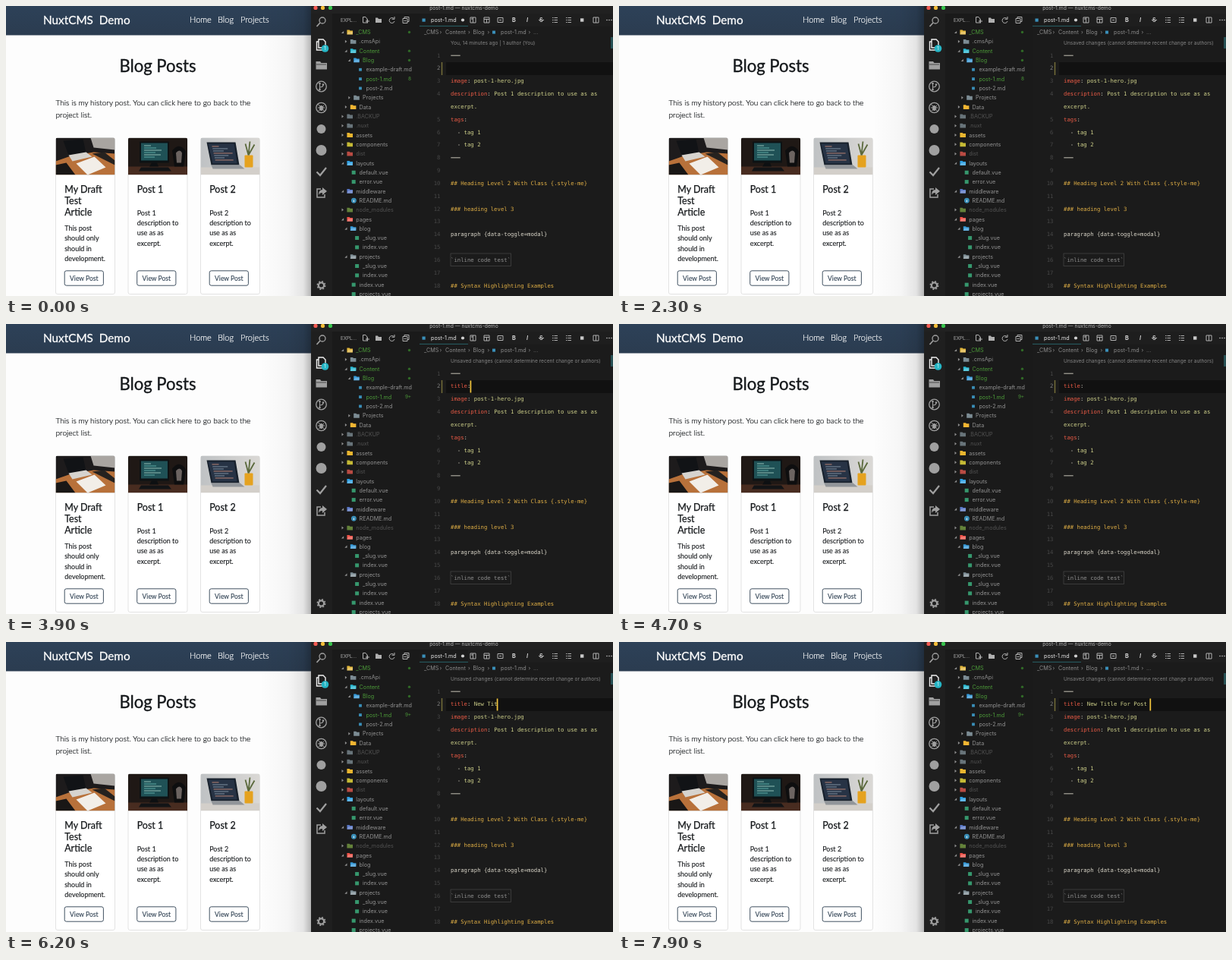
An HTML page for the animation above (8000 ms loop, 800 px wide and 382 px high).

```html
<!DOCTYPE html>
<html>
<head>
<meta charset="utf-8">
<style>
html, body { margin: 0; width: 100%; height: 100%; overflow: hidden; background: #fff; }
svg { display: block; width: 800px; height: 382px; }
text { white-space: pre; }
.lato { font-family: Lato, sans-serif; }
.ui { font-family: Inter, sans-serif; }
.code { font-family: "DejaVu Sans Mono", monospace; font-size: 7.3px; }
</style>
</head>
<body>
<svg id="stage" viewBox="0 0 800 382">
  <defs>
    <linearGradient id="bar" x2="0" y2="1">
      <stop stop-color="#2d4158"/><stop offset="1" stop-color="#2b3c50"/>
    </linearGradient>
    <linearGradient id="shade">
      <stop stop-opacity="0"/><stop offset=".55" stop-opacity=".03"/>
      <stop offset=".85" stop-opacity=".1"/><stop offset="1" stop-opacity=".28"/>
    </linearGradient>
    <linearGradient id="wall"><stop stop-color="#bfc2c4"/><stop offset="1" stop-color="#dad8d5"/></linearGradient>
    <clipPath id="photo"><path d="M0 49V2Q0 0 2 0H76Q78 0 78 2V49Z"/></clipPath>
  </defs>
</svg>
<script>
const stage = document.getElementById('stage');
const out = [];
const add = s => out.push(s);
const rect = (x, y, w, h, fill, extra = '') =>
  add(`<rect x="${x}" y="${y}" width="${w}" height="${h}" fill="${fill}" ${extra}/>`);
const circle = (x, y, r, fill, extra = '') =>
  add(`<circle cx="${x}" cy="${y}" r="${r}" fill="${fill}" ${extra}/>`);
const path = (d, fill, extra = '') => add(`<path d="${d}" fill="${fill}" ${extra}/>`);
const line = (d, color = '#b0b0b0', w = 1) => path(d, 'none', `stroke="${color}" stroke-width="${w}"`);
const text = (cls, x, y, size, fill, s, extra = '') =>
  add(`<text class="${cls}" x="${x}" y="${y}" font-size="${size}" fill="${fill}" ${extra}>${s}</text>`);
const lato = (...a) => text('lato', ...a);
const ui = (...a) => text('ui', ...a);
const bolder = (color, w) => `stroke="${color}" stroke-width="${w}"`;

const INK = '#15181b';

function drawPage() {
  const light = 'font-weight="300" ';
  rect(0, 0, 402, 382, '#fdfdfd');
  rect(0, 0, 402, 38.5, 'url(#bar)');
  lato(49, 23.5, 15.3, '#fff', 'NuxtCMS\u00a0\u00a0Demo', bolder('#fff', .3));
  [[242, 'Home'], [279, 'Blog'], [309, 'Projects']].forEach(([x, s]) =>
    lato(x, 21.5, 11, '#fff', s, light + bolder('#fff', .2)));
  lato(200, 87, 22.1, INK, 'Blog Posts', 'text-anchor="middle" ' + bolder(INK, .35));
  ['This is my history post. You can click here to go back to the', 'project list.'].forEach((s, i) =>
    lato(65.5, 131 + i * 16, 10.14, INK, s, light + bolder(INK, .18)));
  const cards = [
    [65.5, ['My Draft', 'Test', 'Article'], ['This post', 'should only', 'should in', 'development.'], 293, deskPhoto],
    [161, ['Post 1'], ['Post 1', 'description to', 'use as as', 'excerpt.'], 272.5, monitorPhoto],
    [256.5, ['Post 2'], ['Post 2', 'description to', 'use as as', 'excerpt.'], 272.5, laptopPhoto]
  ];
  for (const [x, title, body, y, photo] of cards) {
    rect(x, 174, 78, 205.5, '#fff', 'rx="2.5" stroke="#dcdcdc" stroke-width=".8"');
    add(`<g transform="translate(${x} 173.5)" clip-path="url(#photo)">`);
    photo();
    add('</g>');
    title.forEach((s, i) => lato(x + 11.7, 245.5 + i * 15.2, 12.5, INK, s, bolder(INK, .25)));
    body.forEach((s, i) => lato(x + 11.7, y + 3 + i * 13.4, 9, INK, s, bolder(INK, .1)));
    rect(x + 11.7, 348.8, 51.2, 19.4, '#fff', 'rx="2.4" stroke="#2c3e50" stroke-width=".9"');
    lato(x + 37.3, 361.8, 8.5, '#2c3e50', 'View Post', 'text-anchor="middle" ' + bolder('#2c3e50', .1));
  }
  rect(335, 0, 67, 382, 'url(#shade)');
}

function deskPhoto() {
  rect(0, 0, 78, 49, '#1d1b1c');
  path('M46 0H78V16L50 13Z', '#a9a5a1');
  path('M0 31L20 24 50 19 78 21V49H0Z', '#b8713a');
  path('M10 4L36 2 40 20 17 23Z', '#111316');
  path('M17 23L40 19 48 25 22 31Z', '#d6d3ce');
  path('M27 34L51 25 66 39 42 49Z', '#f2eee8');
  path('M48 21L64 19 78 30V36Z', '#26221f');
  path('M0 36L14 33 26 49H0Z', '#191716');
}

function monitorPhoto() {
  rect(0, 0, 78, 49, '#1f1815');
  rect(0, 38, 78, 11, '#482c20');
  rect(15, 5, 39, 28, '#0d1214', 'rx="1"');
  rect(17, 7, 35, 23, '#1f5156');
  for (let i = 0; i < 6; i++) rect(21, 10 + i * 3, 9 + i * 7 % 15, 1, i % 2 ? '#5fa9a4' : '#92bdb3');
  path('M31 33H38L40 38H28Z', '#0d1012');
  path('M17 39H53L57 44H14Z', '#121416');
  path('M58 17Q68 5 76 18L73 38H61Z', '#0e0e0f');
  path('M63 20Q68 14 71 20L70 33H64Z', '#6c6461');
}

function laptopPhoto() {
  rect(0, 0, 78, 49, 'url(#wall)');
  rect(0, 39, 78, 10, '#d3cfca');
  path('M8 6H46L51 36H14Z', '#18212c');
  path('M10 8H44L48 34H16Z', '#273345');
  for (let i = 0; i < 7; i++) rect(15 + i * .7, 11 + i * 3, 9 + i * 11 % 17, .9, i % 3 ? '#8798a8' : '#c88b79');
  path('M14 36H52L58 41H16Z', '#92969a');
  rect(58, 23, 11, 16, '#e5a21f', 'rx="1"');
  line('M63 23L59 8M63 23L65 5M63 23L71 9', '#5b693c', 1.8);
}

function drawActivityBar() {
  const c = '#a0a0a0';
  circle(417, 19, 4, 'none', `stroke="${c}" stroke-width="1.3"`);
  line('M414 22L409.5 27', c, 1.7);
  line('M412 44H418L421 47V55H412ZM412 47H409.5V58H417', '#f0f0f0', 1.4);
  circle(420.5, 56, 4.8, '#25b5c5');
  ui(420.5, 58.3, 6, '#fff', '1', 'text-anchor="middle"');
  path('M408.5 73H414L415.5 75H423V83.5H408.5Z', c);
  line('M409 77H422', '#333', .8);
  circle(415.5, 106, 6.8, 'none', `stroke="${c}" stroke-width="1.3"`);
  line('M413.5 102V110M413.5 107Q418 107 418 104', c, 1.1);
  [[413.5, 102], [418, 103.5], [413.5, 110]].forEach(([x, y]) => circle(x, y, 1.3, c));
  circle(415.5, 134, 6.7, 'none', `stroke="${c}" stroke-width="1.3"`);
  add(`<ellipse cx="415.5" cy="134.5" rx="2.4" ry="3.6" fill="${c}"/>`);
  line('M411 129L420 139M411 134H420M412 138L419 131', c);
  circle(415.5, 162, 6, c);
  circle(415.5, 190, 7, c);
  line('M409.5 218.5L414 223 422 213', c, 2.2);
  line('M415 241H410V252H420V248', c, 1.5);
  path('M417 239L423 244 417 249V246Q413 246 412 249 412 242 417 242Z', c);
  circle(415.5, 368, 3.6, 'none', `stroke="${c}" stroke-width="2.2"`);
  circle(415.5, 368, 5.2, 'none', `stroke="${c}" stroke-width="1.5" stroke-dasharray="2.04"`);
}

// depth, kind (open, closed, leaf kinds), name, icon colour, text colour
const GREEN = '#4c9a39', DIM = '#525252', PLAIN = '#929292', BLUE = '#3a8fb9', VUE = '#36976d';
const tree = [
  [0, 'open', '_CMS', '#e0b53b', GREEN], [1, 'closed', '.cmsApi', '#7c8c94'],
  [1, 'open', 'Content', '#27b7d0', GREEN], [2, 'open', 'Blog', '#3599d8', GREEN],
  [3, 'md', 'example-draft.md', BLUE], [3, 'md', 'post-1.md', BLUE, GREEN], [3, 'md', 'post-2.md', BLUE],
  [2, 'closed', 'Projects', '#7c8c94'], [1, 'closed', 'Data', '#f2b632'],
  [0, 'closed', '.BACKUP', '#68747a', DIM], [0, 'closed', '.nuxt', '#68747a', DIM],
  [0, 'closed', 'assets', '#e9b52f'], [0, 'closed', 'components', '#c5ba35'],
  [0, 'closed', 'dist', '#b94b43', DIM], [0, 'open', 'layouts', '#2d9fe3'],
  [1, 'vue', 'default.vue', VUE], [1, 'vue', 'error.vue', VUE],
  [0, 'open', 'middleware', '#5876c5'], [1, 'info', 'README.md', BLUE],
  [0, 'closed', 'node_modules', '#64823a', DIM], [0, 'open', 'pages', '#ee5147'],
  [1, 'open', 'blog', '#3599d8'], [2, 'vue', '_slug.vue', VUE], [2, 'vue', 'index.vue', VUE],
  [1, 'open', 'projects', '#7c8c94'], [2, 'vue', '_slug.vue', VUE], [2, 'vue', 'index.vue', VUE],
  [1, 'vue', 'index.vue', VUE], [1, 'vue', 'projects.vue', VUE]
];

function drawTree() {
  tree.forEach(([depth, kind, name, icon, color = PLAIN], i) => {
    const y = 34.5 + i * 12.32, dx = depth * 4.4, x = 453 + dx;
    if (kind === 'open' || kind === 'closed') {
      const ax = 443.5 + dx;
      path(kind === 'open' ? `M${ax + 1.6} ${y - 1.6}V${y + 1.6}H${ax - 1.6}Z`
        : `M${ax - 1} ${y - 2}L${ax + 1.5} ${y} ${ax - 1} ${y + 2}Z`, '#909090');
      path(`M${x - 3.6} ${y - 2.9}H${x - .4}L${x + .6} ${y - 1.9}H${x + 4}V${y + 2.9}H${x - 3.6}Z`, icon);
      if (kind === 'open') path(`M${x - 2} ${y - .6}H${x + 4.4}L${x + 3.4} ${y + 2.9}H${x - 3.6}Z`, '#fff', 'opacity=".25"');
    } else if (kind === 'info') {
      circle(x + 1, y, 3.4, icon);
      rect(x + .5, y - .6, 1, 2.4, '#fff');
    } else {
      const s = kind === 'md' ? 3.8 : 5;
      rect(x + .8 - s / 2, y - s / 2, s, s, icon);
    }
    ui(461.2 + dx, y + 2.6, 7.2, color, name);
  });
  [0, 2, 3].forEach(i => circle(531.5, 34.5 + i * 12.32, 1.7, '#316b27'));
  ui(532, 98.4, 6.4, GREEN, '8', 'id="badge" text-anchor="middle"');
}

function drawToolbar() {
  [['#f35b52', 408], ['#f4bd39', 417.5], ['#38c44d', 427.5]].forEach(([c, x]) => circle(x, 2.4, 2.6, c));
  ui(603.5, 5, 6.75, '#b5b5b5', 'post-1.md — nuxtcms-demo', 'text-anchor="middle"');
  ui(441, 20.8, 6.3, '#b0b0b0', 'EXPL...');
  line('M470.5 14.5H474L476 17V22H470.5ZM474 20H479M476.5 17.5V22.5');
  path('M487 15.5H490L491 17H495V22H487Z', '#b0b0b0');
  line('M511.5 17A3.5 3.5 0 1 0 512 20M512 14V17.3H508.5');
  line('M523 16.5H529V22.5H523ZM525 16V14.5H531V20.5H529M524.5 19.5H527.5');
  rect(548.5, 16.5, 4.2, 4.2, BLUE);
  ui(560, 21, 7.2, '#e8e8e8', 'post-1.md');
  circle(602, 18.5, 2.1, '#d0d0d0');
  line('M545 26.4H609', '#2b6870', .9);
  line('M612 15H619V22H612ZM615.5 15V22M613 17H615');
  line('M630 15H637V22H630ZM630 17.5H637M633.5 17.5V22');
  line('M648 15.5H655V21.5H648ZM650 18.5H653');
  ui(667, 21, 7.3, '#ddd', 'B', 'font-weight="700"');
  ui(686, 21, 7.3, '#ddd', 'I', 'font-weight="600" font-style="italic"');
  ui(703, 21, 7.3, '#ddd', 'S', 'font-weight="600"');
  line('M702 18.5H709');
  [720, 738].forEach(x => line([15.5, 18.5, 21.5].map(y => `M${x} ${y}h1.5m1 0h4.5`).join('')));
  rect(757, 16.3, 4.4, 4.4, '#c8c8c8');
  line('M774 15H781V22H774ZM777.5 15V22');
  [792, 795, 798].forEach(x => circle(x, 18.5, .8, '#c8c8c8'));
  [[551, '_CMS'], [571.5, '›'], [579, 'Content'], [609, '›'], [615.5, 'Blog'], [634.5, '›'],
   [652, 'post-1.md'], [688.5, '›'], [695, '...']].forEach(([x, s]) => ui(x, 37, 7.2, '#8c8c8c', s));
  rect(641, 32.6, 4, 4, BLUE);
}

const KEY = '#e85a45', VALUE = '#ced08a', HEAD = '#dfae45', WHITE = '#d9d5c8';
const span = (color, s) => `<tspan fill="${color}">${s}</tspan>`;
const pair = (key, value) => span(KEY, key) + span(WHITE, ':') + span(VALUE, value);

function drawEditor() {
  ui(586, 50.5, 6.6, '#858585', '', 'id="lens"');
  rect(580, 74, 220, 17, '#111');
  rect(573.8, 74, 1.4, 17, '#77713a');
  const rows = [
    '---', '', pair('image', ' post-1-hero.jpg'), pair('description', ' Post 1 description to use as as'),
    span(VALUE, 'excerpt.'), pair('tags', ''), '  - ' + span(VALUE, 'tag 1'), '  - ' + span(VALUE, 'tag 2'), '---', '',
    span(HEAD, '## Heading Level 2 With Class {.style-me}'), '', span(HEAD, '### heading level 3'), '',
    'paragraph {data-toggle=modal}', '', span('#8f8f8f', '`inline code test`'), '', span(HEAD, '## Syntax Highlighting Examples')
  ];
  rect(586, 326, 79.5, 16.5, 'none', 'stroke="#424242" stroke-width=".8"');
  let number = 0;
  rows.forEach((s, i) => {
    const y = 67.6 + i * 16.83;
    if (i !== 4) text('code', 572.5, y, 7, ++number === 2 ? '#808080' : '#474747', number, 'text-anchor="end"');
    if (s === '---') line(`M586.3 ${y - 2.4}h12.4`, WHITE, .9);
    else text('code', 586, y, 7.3, WHITE, s, i === 1 ? 'id="typed"' : '');
  });
  rect(0, 74.5, 1.7, 16, '#f4c63d', 'id="cursor"');
  rect(797, 41, 3, 15, '#275154');
}

drawPage();
rect(402, 0, 398, 382, '#1b1b1b');
rect(402, 0, 398, 10, '#212121');
rect(402, 10, 28, 372, '#1f1f1f');
rect(430, 10, 115, 372, '#1a1a1a');
rect(545, 10, 255, 17, '#1e1e1e');
rect(545, 10, 64, 17, '#1b1b1b');
drawActivityBar();
drawTree();
drawToolbar();
drawEditor();
stage.insertAdjacentHTML('beforeend', out.join(''));

const [lens, typed, cursor, badge] = ['lens', 'typed', 'cursor', 'badge'].map(id => document.getElementById(id));
const message = 'title: New Title For Post ';
const keyTimes = [2800, 2900, 3000, 3200, 3400, 3600, 4000, 5300, 5400, 5600, 5700, 5900, 6000,
  6100, 6300, 6400, 6500, 6700, 6800, 6900, 7000, 7200, 7300, 7500, 7600, 7700];
const CHAR = 7.3 * .602;

function render(t) {
  const n = keyTimes.filter(k => k <= t).length;
  const s = message.slice(0, n);
  typed.innerHTML = n < 6 ? span(VALUE, s) : pair('title', s.slice(6));
  lens.textContent = t < 400 ? 'You, 14 minutes ago | 1 author (You)' : 'Unsaved changes (cannot determine recent change or authors)';
  badge.textContent = t < 3800 ? '8' : '9+';
  badge.setAttribute('x', t < 3800 ? 532 : 530);
  const since = n ? t - keyTimes[n - 1] : t + 500;
  cursor.setAttribute('x', 585.2 + n * CHAR);
  cursor.setAttribute('visibility', since % 1000 < 500 ? 'visible' : 'hidden');
}

const start = performance.now();
function tick() {
  render((performance.now() - start) % 8000);
  requestAnimationFrame(tick);
}
tick();
</script>
</body>
</html>
```
